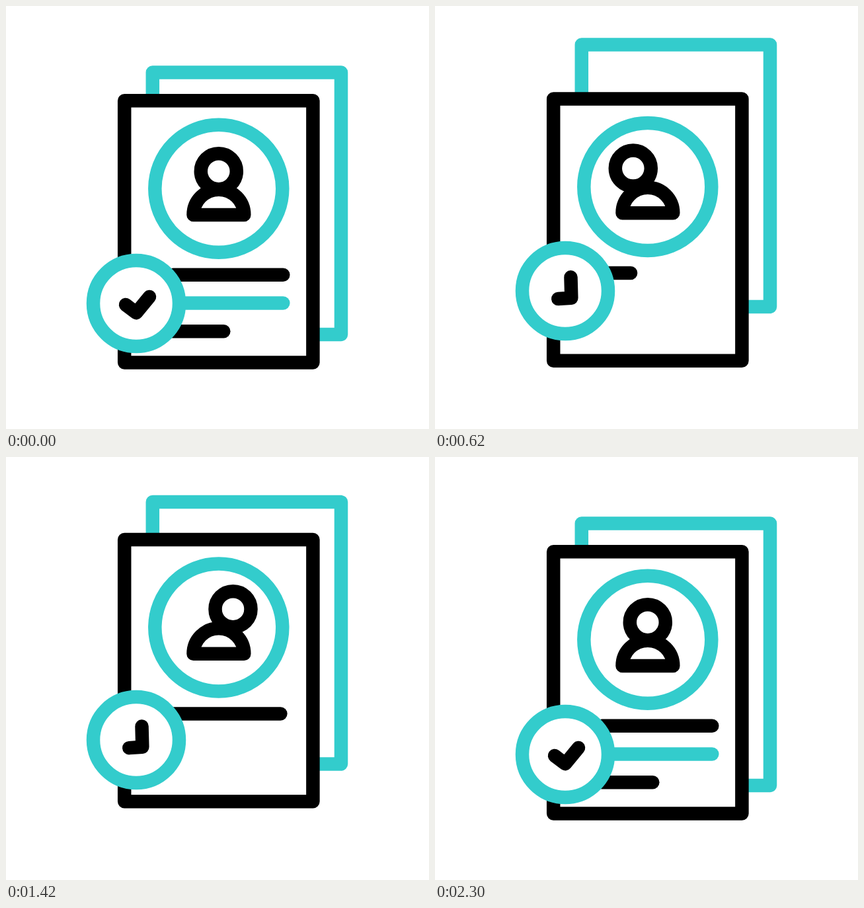
Recreate the animation shown at these times as an HTML page. Size 640 by 640 pixels, loop 2400 ms.

```html
<!DOCTYPE html>
<html lang="en">
<head>
<meta charset="utf-8">
<title>Approved profile</title>
<style>
  html, body { margin: 0; width: 100%; height: 100%; overflow: hidden; background: #fff; }
  svg { display: block; width: 100%; height: 100%; }
  svg * { stroke-width: 20.5; stroke-linecap: round; stroke-linejoin: round; }
  .dark { stroke: #000; fill: #fff; }
  .teal { stroke: #3cc; fill: #fff; }
  .open { fill: none; }
</style>
</head>
<body>
<svg viewBox="0 0 640 640">
  <rect id="back" class="teal" x="221.8" y="100.5" width="285.2" height="396.5"/>
  <g id="front">
    <rect class="dark" x="179.2" y="143.3" width="285.2" height="396.2"/>
    <circle class="teal" cx="321.8" cy="276.3" r="96.5"/>
    <path class="dark" d="M283.5 316a38.4 38.4 0 0 1 76.8 0z"/>
    <circle id="head" class="dark" cx="321.8" cy="250.2" r="27"/>
    <path id="line1" class="dark" d="M252.7 406.8h166.6"/>
    <path id="line2" class="teal" d="M252.7 449.5h166.6"/>
    <path id="line3" class="dark" d="M252.7 492.2h76.6"/>
  </g>
  <g id="badge">
    <circle class="teal" cx="197" cy="450" r="65"/>
    <path id="tick" class="dark open" d="M181 452l16 12.2 20-24.2"/>
  </g>
</svg>
<script>
const LOOP = 2400;
const $ = id => document.getElementById(id);

const sine = k => (1 - Math.cos(Math.PI * k)) / 2;
const firm = k => k * k * k * (10 - 15 * k + 6 * k * k);
const progress = (t, from, to) => Math.min(1, Math.max(0, (t - from) / (to - from)));

// Rest, then evenly spaced turning points, then rest again.
function swing(t, { start = 0, first, step, end, turns, ease = sine }) {
  const last = turns.length - 1;
  const time = i => i < 0 ? start : i > last ? end : first + i * step;
  const level = i => turns[i] || 0;
  let i = 0;
  while (i <= last && t > time(i)) i++;
  const k = ease(progress(t, time(i - 1), time(i)));
  return level(i - 1) + (level(i) - level(i - 1)) * k;
}

// The pages share one bounce that loses a fifth of its height at each turn.
const bounce = [0, 1, 2, 3].map(n => -50.5 * (-0.81) ** n);
const motion = {
  front: { first: 395, step: 440, end: 2155, turns: bounce },
  back: { start: 130, first: 530, step: 460, end: 2300, turns: bounce },
  badge: { first: 350, step: 360, end: 2150, turns: [53, -31, 53, -22, 14] },
  tick: { first: 520, step: 430, end: 1810, turns: [-50, 18, -42] },
  head: { first: 620, step: 920, end: 1890, turns: [-22, 22.5], ease: firm }
};

// Lines vanish from the bottom up and are written again from the top down.
const lines = [[880, 1480], [1420, 1690], [1640, 1840]].map((write, i) => {
  const el = $('line' + (i + 1));
  return { el, write, wipe: (2 - i) * 210, length: el.getTotalLength() };
});

const move = (id, x, y) => $(id).setAttribute('transform', `translate(${x} ${y})`);

function draw(t) {
  const at = name => swing(t, motion[name]);
  for (const id of ['back', 'front', 'badge']) move(id, 0, at(id));
  const lean = at('head');
  move('head', lean, -0.08 * Math.abs(lean));
  $('tick').setAttribute('transform', `rotate(${at('tick')} 197 450)`);
  for (const { el, write, wipe, length } of lines) {
    const shown = 1 - sine(progress(t, wipe, wipe + 305)) + sine(progress(t, ...write));
    el.style.strokeDasharray = `${length * shown} 400`;
    el.style.visibility = shown > 0.001 ? 'visible' : 'hidden';
  }
}

const begin = performance.now();
function frame() {
  draw((performance.now() - begin) % LOOP);
  requestAnimationFrame(frame);
}
frame();
</script>
</body>
</html>
```
